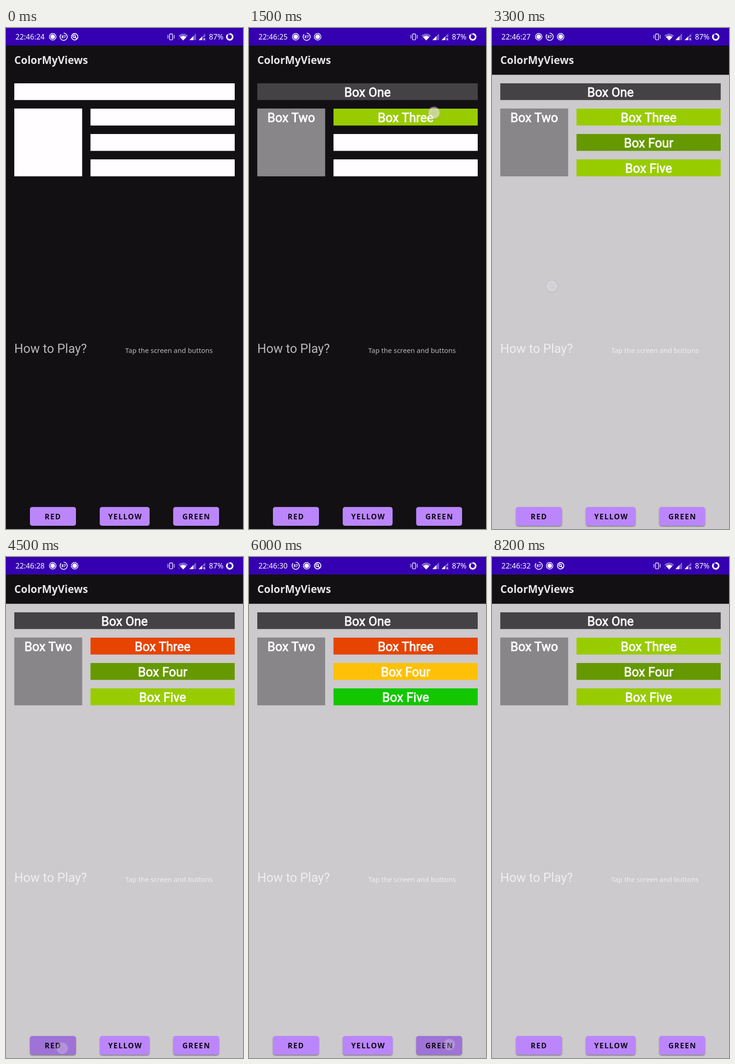
An HTML page that plays this animation: 515x1087 px, repeating every 8300 ms.

```html
<!DOCTYPE html>
<html lang="en">
<head>
<meta charset="utf-8">
<title>ColorMyViews</title>
<style>
  html, body { margin: 0; width: 100%; height: 100%; overflow: hidden; background: #121013; }
  svg { display: block; width: 515px; height: 1087px; font-family: "Noto Sans", sans-serif; }
  .roboto { font: 27.3px Roboto, sans-serif; }
  .label { fill: #fffdff; stroke: #fffdff; stroke-width: .9; text-anchor: middle; }
  .hint { fill: #fff; fill-opacity: .7; }
  .caption { font-size: 16px; font-weight: 600; letter-spacing: 1.6px; fill: #0c0810; }
  .line { fill: none; stroke: #fff; }
</style>
</head>
<body>
<svg id="stage" viewBox="0 0 515 1087">
  <defs>
    <radialGradient id="touch">
      <stop offset="0" stop-color="#d9d5d9" stop-opacity=".86"/>
      <stop offset=".66" stop-color="#e8e3ea" stop-opacity=".86"/>
      <stop offset=".76" stop-color="#e8e3ea" stop-opacity=".86"/>
      <stop offset=".8" stop-color="#a69aba" stop-opacity=".5"/>
      <stop offset="1" stop-color="#a69aba" stop-opacity="0"/>
    </radialGradient>
    <filter id="shadow" x="-10%" y="-20%" width="120%" height="150%">
      <feDropShadow dx="0" dy="1.6" stdDeviation="1.3" flood-color="#000" flood-opacity=".42"/>
    </filter>
    <g id="record">
      <circle r="7.2" class="line" stroke-width="1.5"/>
      <circle r="5" fill="#fff"/>
    </g>
    <g id="level">
      <circle r="7.8" class="line" stroke-width="1.7" pathLength="100" stroke-dasharray="87 13" transform="rotate(-90)"/>
      <text y="3.2" font-size="8.5" font-weight="700" fill="#fff" text-anchor="middle">87</text>
    </g>
    <g id="search">
      <circle r="7" class="line" stroke-width="1.9"/>
      <circle cx="-1" cy="-1" r="2.7" class="line" stroke-width="1.7"/>
      <path d="M0 0L5 5" class="line" stroke-width="2"/>
    </g>
  </defs>

  <rect id="page" width="515" height="1087"/>
  <rect y="38" width="515" height="63.5" fill="#121013"/>
  <rect width="515" height="38" fill="#3500b1"/>
  <text x="18" y="78" font-size="22.8" font-weight="600" fill="#e6e4e6">ColorMyViews</text>

  <g fill="#fff" font-size="16">
    <text id="clock" x="20.5" y="25"></text>
    <use id="icon0" x="101.5" y="19"/>
    <use id="icon1" x="125.3" y="19"/>
    <use id="icon2" x="149.2" y="19"/>
    <rect x="355.4" y="13" width="6.6" height="12.6" rx="1" class="line" stroke-width="1.4"/>
    <path d="M352.3 15l-1 2 1.4 2-1.4 2 1 2M365.1 15l1 2-1.4 2 1.4 2-1 2" class="line" stroke-width="1.1"/>
    <path d="M385 27L374.5 16.5Q385 8 395.5 16.5Z" opacity=".38"/>
    <path d="M385 27L378.2 19.8Q385 14.8 391.8 19.8Z"/>
    <path d="M376 21.5v4" class="line" opacity=".35"/>
    <path d="M398.5 26.3H413V11.8ZM418.5 26.3H433V11.8Z" opacity=".36"/>
    <path d="M398.5 26.3H407V17.8ZM418.5 26.3H426V18.8Z"/>
    <rect x="428" y="20" width="6" height="7" fill="#3500b1"/>
    <text x="428.8" y="26.6" font-size="7" font-weight="700">R</text>
    <text x="441" y="25">87%</text>
    <g fill="none" stroke="#fff" stroke-width="3.4">
      <circle cx="486.2" cy="19.3" r="6.4" opacity=".4"/>
      <circle cx="486.2" cy="19.3" r="6.4" pathLength="100" stroke-dasharray="87 13" transform="rotate(-90 486.2 19.3)"/>
    </g>
  </g>

  <g id="boxes"></g>
  <text class="roboto hint" x="18" y="704.7">How to Play?</text>
  <text class="hint" x="259" y="704.7" font-size="14.9">Tap the screen and buttons</text>
  <g id="buttons"></g>
  <circle id="dot" r="15.5" fill="url(#touch)"/>
</svg>
<script>
const LOOP = 8300, STEP = 100;
const WHITE = '#fffdff', LIME = '#99cc00', GREEN = '#669900';
const $ = id => document.getElementById(id);

function add(parent, tag, attributes, text = '') {
  const node = document.createElementNS('http://www.w3.org/2000/svg', tag);
  for (const key in attributes) node.setAttribute(key, attributes[key]);
  node.textContent = text;
  return parent.appendChild(node);
}

// name, x, y, width, height
const boxes = [
  ['One', 18, 120, 479, 36.3],
  ['Two', 18, 174.7, 147.5, 147.1],
  ['Three', 183.6, 175, 313.4, 36.6],
  ['Four', 183.6, 230, 313.4, 36.6],
  ['Five', 183.6, 285, 313.4, 36.8]
].map(([name, x, y, width, height]) => {
  const box = add($('boxes'), 'rect', { x, y, width, height });
  add($('boxes'), 'text', { class: 'roboto label', x: x + width / 2, y: Math.round(y) + 28.6 }, 'Box ' + name);
  return box;
});

// caption, x, width, caption x
const ripples = [
  ['RED', 52, 100, 84],
  ['YELLOW', 203.7, 108.3, 222],
  ['GREEN', 363.3, 99.7, 383.2]
].map(([caption, x, width, textX]) => {
  const shape = { x, y: 1039.3, width, height: 40.7, rx: 5 };
  add($('buttons'), 'rect', { ...shape, fill: '#bb86fc', filter: 'url(#shadow)' });
  const ripple = add($('buttons'), 'rect', { ...shape, fill: '#000' });
  add($('buttons'), 'text', { class: 'caption', x: textX, y: 1066 }, caption);
  return ripple;
});

// Each tap recolours a box, or the page when box is -1.
const taps = [
  { at: 100, x: 300, y: 138, box: 0, color: '#444244' },
  { at: 700, x: 100, y: 245, box: 1, color: '#888688' },
  { at: 1300, x: 402, y: 184, box: 2, color: LIME },
  { at: 1800, x: 402, y: 247, box: 3, color: GREEN },
  { at: 2300, x: 402, y: 304, box: 4, color: LIME },
  { at: 3000, x: 130, y: 560, box: -1, color: '#cccacc', delay: 200 },
  { at: 4300, x: 122, y: 1066, box: 2, color: '#e64400', button: 0 },
  { at: 5100, x: 270, y: 1061, box: 3, color: '#ffc107', button: 1 },
  { at: 5900, x: 435, y: 1058, box: 4, color: '#12c700', button: 2 },
  { at: 6700, x: 420, y: 306, box: 4, color: LIME },
  { at: 7300, x: 418, y: 250, box: 3, color: GREEN },
  { at: 7800, x: 415, y: 193, box: 2, color: LIME }
];

function iconsAt(t) {
  if (t < 900) return ['record', 'level', 'search'];
  return t < 4900 ? ['record', 'level', 'record'] : ['level', 'record', 'search'];
}

function draw(t) {
  const colors = boxes.map(() => WHITE);
  const pressed = ripples.map(() => 0);
  let page = '#121013', dotOpacity = 0;

  for (const tap of taps) {
    const age = t - tap.at;
    if (age >= (tap.delay || 100)) {
      if (tap.box < 0) page = tap.color;
      else colors[tap.box] = tap.color;
    }
    if (age < 0 || age >= 400) continue;
    const fade = Math.min(1, (400 - age) / 200);
    const isButton = 'button' in tap;
    dotOpacity = fade * (isButton ? .35 : tap.box < 0 ? .95 : .75);
    $('dot').setAttribute('cx', tap.x);
    $('dot').setAttribute('cy', tap.y);
    if (isButton) pressed[tap.button] = .15 * fade;
  }

  $('page').setAttribute('fill', page);
  $('dot').setAttribute('opacity', dotOpacity);
  boxes.forEach((box, i) => box.setAttribute('fill', colors[i]));
  ripples.forEach((ripple, i) => ripple.setAttribute('opacity', pressed[i]));
  iconsAt(t).forEach((icon, i) => $('icon' + i).setAttribute('href', '#' + icon));
  $('clock').textContent = '22:46:' + Math.floor(24.1 + t / 1000);
}

function tick() {
  const t = performance.now() % LOOP;
  draw(Math.floor(t / STEP) * STEP);
  requestAnimationFrame(tick);
}
tick();
</script>
</body>
</html>
```
